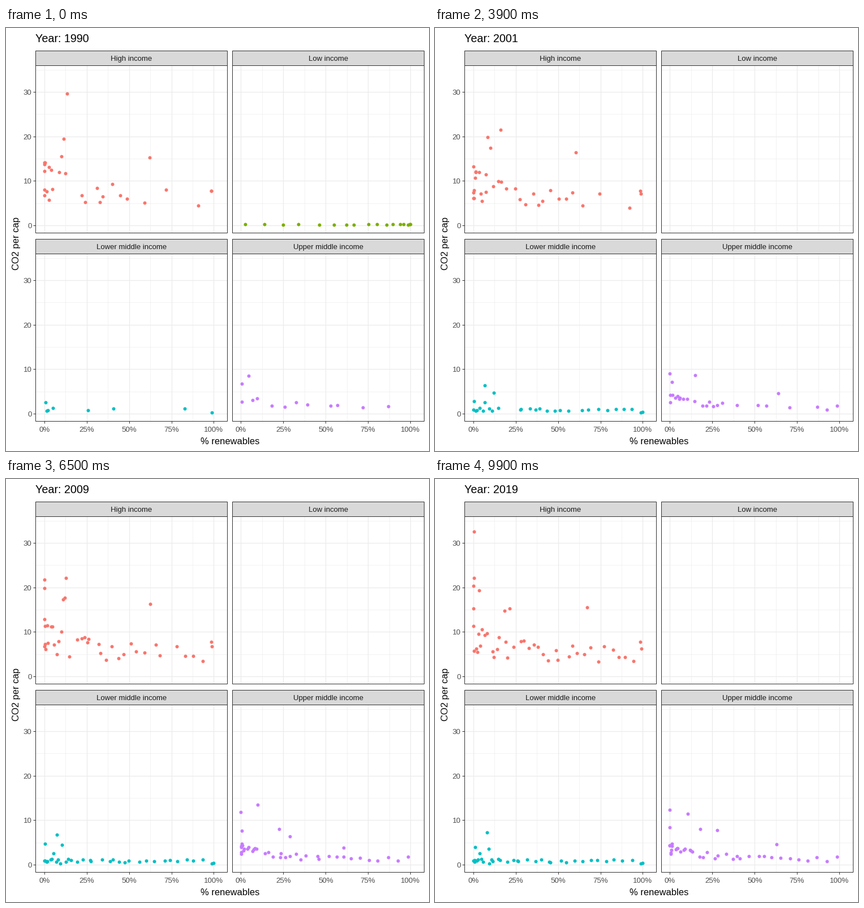
Recreate the animation shown at these times as a matplotlib script. Size 748 by 748 pixels, loop 10 s.

```python
import matplotlib.pyplot as plt
import numpy as np
from matplotlib.animation import FuncAnimation
from matplotlib.patches import Rectangle

SIZE, FRAMES = 748, 100
START, SPAN = 1990, 29
PX = 0.72  # points per pixel at 100 dpi
DARK, GRID = "#333333", "#EBEBEB"

rng = np.random.default_rng(7)
plt.rcParams["font.family"] = "Liberation Sans"
fig = plt.figure(figsize=(SIZE / 100, SIZE / 100), dpi=100, facecolor="white")
ax = fig.add_axes([0, 0, 1, 1])
ax.set(xlim=(0, SIZE), ylim=(SIZE, 0))
ax.axis("off")


def line(xs, ys, color, width=1, z=1):
    ax.plot(xs, ys, color=color, lw=width * PX, zorder=z,
            solid_capstyle="butt", snap=True)


def box(x, y, w, h, face):
    ax.add_patch(Rectangle((x, y), w, h, fc=face, ec=DARK, lw=PX,
                           zorder=4, snap=True))


def label(x, y, s, size, color="black", **kw):
    kw = {"ha": "center", "va": "baseline", "zorder": 5, **kw}
    return ax.text(x, y, s, fontsize=size * PX, color=color, **kw)


def cloud(n, early, joins, bend, base, rise=0, spread=0.5, trend=(1, 1),
          until=np.inf, mirror=False):
    """Dots along a falling curve that drift from year to year.

    The first `early` dots are there at the start, the others join evenly
    within the years `joins`. `bend` crowds them towards one end.
    """
    u = (np.arange(n) + 0.2) / (n - 0.6)
    order = rng.permutation(n)
    born = np.where(order < early, START,
                    np.interp(order, [early, n], joins))
    years = np.linspace(0, 1, SPAN + 2)[:, None]
    power = bend[0] + (bend[1] - bend[0]) * years
    pct = 100 * (1 - (1 - u).clip(0) ** power if mirror else u ** power)
    pct = (pct + rng.normal(0, 1.5, pct.shape) * np.sin(np.pi * u.clip(0, 1)))
    pct = pct.clip(0, 100)
    luck = 1 + spread * rng.uniform(-1, 1, n) + rng.normal(0, 0.04, pct.shape)
    co2 = (base + rise * np.exp(-pct / 22)) * luck
    co2 *= trend[0] + (trend[1] - trend[0]) * years

    def at(year):
        i = int(year - START)
        t = year - START - i
        seen = (born <= year) & (year < until)
        both = np.column_stack([a[i] + (a[i + 1] - a[i]) * t
                                for a in (pct, co2)])
        return both[seen]
    return at


def track(*keys):
    """One dot led through (year, share, CO2) keys, unseen before the first."""
    years, pct, co2 = zip(*keys)

    def at(year):
        if year < years[0]:
            return np.empty((0, 2))
        return np.array([[np.interp(year, years, pct),
                          np.interp(year, years, co2)]])
    return at


class Panel:
    def __init__(self, name, color, col, row, *parts):
        self.dx, self.dy, self.parts = 347.5 * col, 333 * row, parts
        left, top = 52.5 + 348 * col, 39.5 + self.dy
        right, low = left + 339, top + 322
        box(left, top, 339, 26, "#D9D9D9")
        box(left, top + 26, 339, 296, "none")
        label(left + 169.5, top + 18.3, name, 13.1, "#1A1A1A")
        for i in range(9):
            x, y = self.place(12.5 * i, 5 * i)
            width = 0.6 if i % 2 else 1.2
            line([x, x], [top + 26, low], GRID, width)
            if i < 8:
                line([left, right], [y, y], GRID, width)
            if row and i % 2 == 0:
                line([x, x], [low, low + 4], DARK)
                label(x, 713.6, f"{25 * i // 2}%", 13.2, "#4D4D4D")
            if not col and i in (0, 2, 4, 6):
                line([left - 4, left], [y, y], DARK)
                label(45.5, y + 5, str(5 * i), 13.2, "#4D4D4D", ha="right")
        self.dots = ax.scatter([], [], s=(6 * PX) ** 2, c=color, lw=0,
                               zorder=3)

    def place(self, pct, co2):
        return 68 + self.dx + 2.995 * pct, 349 + self.dy - 7.867 * co2

    def update(self, year):
        pts = np.vstack([part(year) for part in self.parts])
        self.dots.set_offsets(np.column_stack(self.place(*pts.T)))


panels = [
    Panel("High income", "#F8766D", 0, 0,
          cloud(37, 25, (1992, 2014), (2.8, 1.6), 5.2, 4.2, 0.38, (1.1, 0.9)),
          track((1990, 62, 15.2), (2004, 60, 16.7), (2019, 67, 15.5)),
          track((1990, 13.4, 29.6), (1994, 11.7, 19.2), (2001, 16.8, 21.2),
                (2006, 6.9, 24.8), (2013, 20, 18.7), (2019, 21.4, 15.3)),
          track((1990, 11.5, 19.4), (1994, 7.2, 15.9), (2001, 8, 20),
                (2013, 14, 16.5), (2019, 18.2, 14.8)),
          track((1990, 10, 15.5), (2006, 9.9, 18.2), (2013, 12.7, 16.1),
                (2019, 3.3, 19.3)),
          track((2008, 0, 20.9), (2013, 0, 24.8), (2019, 0.3, 22.1)),
          track((2008, 0, 19.8), (2019, 0, 20.3)),
          track((2011, 0.4, 32.6)),
          track((2011, 0, 17), (2019, 0, 15.3)),
          track((1990, 98.5, 7.7))),
    Panel("Low income", "#7CAE00", 1, 0,
          cloud(17, 17, (1990, 1990), (2, 2), 0.2, until=2000, mirror=True)),
    Panel("Lower middle income", "#00BFC4", 0, 1,
          cloud(32, 7, (2000, 2002), (1.7, 1.7), 0.7, 0.1, 0.7),
          track((1990, 0.8, 2.5), (2001, 0.3, 2.6), (2006, 0.3, 4.9),
                (2019, 1, 4)),
          track((1993, 5.6, 8), (2001, 6.7, 6.3), (2019, 7.9, 7.2)),
          track((1993, 14.3, 4.7), (2006, 10.6, 4.8), (2019, 8.9, 3.5)),
          track((2000, 7, 2.5), (2019, 3.7, 2.6)),
          track((2000, 100, 0.4))),
    Panel("Upper middle income", "#C77CFF", 1, 1,
          cloud(36, 11, (2000, 2003), (2.2, 2.2), 1.3, 2.5, 0.4),
          track((1990, 0.6, 6.8), (2001, 0, 8.8), (2006, 0, 10.8),
                (2013, 0, 13.1), (2019, 0, 12.3)),
          track((1990, 4.5, 8.5), (2001, 1.1, 7.1), (2019, 0, 8.4)),
          track((1993, 13.3, 12), (2001, 15.2, 8.3), (2006, 11.3, 12.1),
                (2013, 8, 15.3), (2019, 10.4, 11.5)),
          track((2002, 31, 7.2), (2013, 18, 8.5), (2019, 18, 8)),
          track((2002, 9, 6.6), (2009, 29, 6.4), (2019, 28, 7.7)),
          track((2000, 65, 4.9), (2006, 60, 3.6), (2019, 63, 4.6))),
]

title = label(52.5, 25, "", 19.8, ha="left")
label(395.7, 736, "% renewables", 16.5)
label(26, 380.5, "CO2 per cap", 16.5, rotation=90, va="center", ha="right")


def draw(f):
    year = START + SPAN * f / (FRAMES - 1)
    title.set_text(f"Year: {round(year)}")
    for p in panels:
        p.update(year)
    return [title, *(p.dots for p in panels)]


anim = FuncAnimation(fig, draw, frames=FRAMES, interval=100, repeat=True,
                     repeat_delay=0, blit=False)
plt.show()
```
